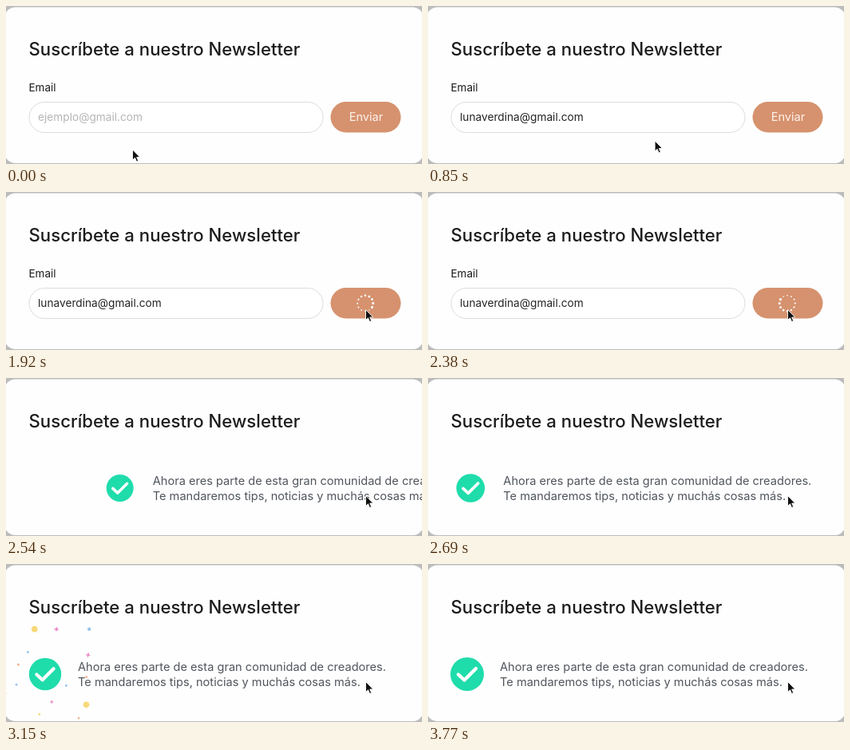
Write an HTML page that moves like this. It is 521 by 198 pixels and loops after 4380 ms.

```html
<!DOCTYPE html>
<html lang="es">
<head>
<meta charset="utf-8">
<title>Newsletter</title>
<style>
  html, body { margin: 0; width: 100%; height: 100%; overflow: hidden; background: #bcbcbc; }
  svg { display: block; width: 521px; height: 198px; font: 14.6px Inter, "Open Sans", sans-serif; }
</style>
</head>
<body>
<svg viewBox="0 0 521 198">
  <rect x="-2" y="1.5" width="525" height="195.5" rx="14" fill="#fefefe"/>
  <text x="28.5" y="62" font-size="22.2" font-weight="500" fill="#1c1c1e">Suscríbete a nuestro Newsletter</text>

  <g id="form">
    <text x="28.5" y="107" font-size="13.5" fill="#1c1c1e">Email</text>
    <rect x="29" y="120.5" width="368" height="38" rx="19" fill="#fff" stroke="#dcdcdc"/>
    <text id="email" x="40" y="144" font-size="13.7"></text>
    <rect x="406.5" y="120" width="88" height="38.5" rx="19.25" fill="#d6926e"/>
    <text id="send" x="451" y="144.3" text-anchor="middle" fill="#fdf3ec">Enviar</text>
    <g id="spinner" fill="#fff"></g>
  </g>

  <g id="message" fill="#50555c">
    <text x="90" y="133.5">Ahora eres parte de esta gran comunidad de creadores.</text>
    <text x="90" y="153">Te mandaremos tips, noticias y muchás cosas más.</text>
  </g>
  <g id="confetti"></g>
  <g id="check">
    <circle r="21" fill="#1fdcab"/>
    <path d="M-11 .5L-3.5 7.5 11-7" fill="none" stroke="#fff" stroke-width="4.4" stroke-linecap="round" stroke-linejoin="round"/>
  </g>

  <g id="cursor" stroke-linejoin="round">
    <path id="arrow" d="M0 0V13L3 10.3 5 15 7.2 14 5.2 9.5H9.3Z" fill="#111" stroke="#fff" stroke-width=".9"/>
    <path id="beam" d="M-3-7.5Q0-7.5 0-5.5V5.5Q0 7.5-3 7.5M3-7.5Q0-7.5 0-5.5M0 5.5Q0 7.5 3 7.5" fill="none" stroke="#333" stroke-width="1.1"/>
    <path id="hand" d="M-1.5 1.8Q-1.5 .3 0 .3T1.5 1.8V6.5Q3 5 4.3 6.8 6 5.6 7 7.4 9 6.8 9 9V11.5Q9 13.5 7.6 15V16.5H-.2V15L-4.6 9.8Q-5 7.6-3.2 8.2L-1.5 10ZM1.9 10.5V13.5M4 10.5V13.5M6.1 10.5V13.5" fill="#fff" stroke="#222" stroke-width="1"/>
  </g>
</svg>

<script>
const LOOP = 4380, STEP = 1000 / 13;
const $ = id => document.getElementById(id);
const clamp = v => Math.min(1, Math.max(0, v));
const span = (t, from, to) => clamp((t - from) / (to - from));
const show = (id, on) => $(id).setAttribute('opacity', +on);
const move = (el, transform) => el.setAttribute('transform', transform);

function add(parent, tag, attrs) {
  const el = document.createElementNS('http://www.w3.org/2000/svg', tag);
  for (const key in attrs) el.setAttribute(key, attrs[key]);
  return parent.appendChild(el);
}

// Cursor path: time, x, y
const path = [
  [0, 158.5, 180], [77, 158, 176], [154, 154, 163], [231, 152, 154], [620, 152, 154],
  [692, 168, 168], [769, 222, 177], [846, 284, 169], [923, 345, 168], [1000, 398, 167],
  [1077, 432, 163], [1154, 446, 157], [1380, 451, 148], [1770, 451, 148], [1846, 450.5, 147.5]
];

function cursorAt(t) {
  const i = path.findIndex(p => p[0] > t);
  if (i < 0) return path[path.length - 1].slice(1);
  const [a, b] = [path[i - 1], path[i]];
  const u = span(t, a[0], b[0]);
  return [a[1] + (b[1] - a[1]) * u, a[2] + (b[2] - a[2]) * u];
}

const DOTS = 12;
for (let i = 0; i < DOTS; i++) {
  const a = i / DOTS * 2 * Math.PI;
  add($('spinner'), 'circle', { cx: 9.8 * Math.cos(a), cy: 9.8 * Math.sin(a), r: 0.75 + 0.9 * i / DOTS });
}

const colors = { y: '#f5c022', p: '#d9339f', b: '#4c9be0', o: '#e5793f' };
const shapes = {
  dot: 'M-1 0A1 1 0 1 1 1 0A1 1 0 1 1-1 0',
  box: 'M-1-.6L.6-1 1 .6-.6 1Z',
  cross: 'M-1-.3L-.3-.3-.1-1 .4-.9 .3-.2 1 .1 .8 .5 .2 .3 0 1-.5 .9-.3 .3-1 .2Z',
  star: 'M0-1L.3-.35 1-.3 .45 .2 .6 .95 0 .5-.6 .95-.45 .2-1-.3-.3-.35Z'
};
// Offset from the badge, size, colour, shape
const bits = [
  [-11, -47, 5, 'y', 'dot'], [12, -47, 3.6, 'p', 'cross'], [46, -47, 3, 'b', 'box'],
  [-47, -45, 2.2, 'b', 'box'], [-43, -27, 2, 'y', 'dot'], [45, -20, 3.5, 'p', 'cross'],
  [-18, -23, 2, 'b', 'box'], [-28, -10, 2, 'o', 'box'], [-43, 21, 4.8, 'o', 'star'],
  [-44, 43, 3.2, 'p', 'cross'], [-6, 42, 1.8, 'y', 'dot'], [7, 29, 2.8, 'p', 'cross'],
  [43, 32, 5, 'y', 'dot'], [35, 46, 1.9, 'o', 'box'], [22, 12, 2, 'b', 'box'],
  [43, 3, 2, 'o', 'box'], [-30, 11, 2, 'b', 'box']
].map(([x, y, size, color, shape]) => ({
  x, y, size, el: add($('confetti'), 'path', { d: shapes[shape], fill: colors[color] })
}));

function draw(t) {
  const filled = t >= 538;
  $('email').textContent = filled ? 'lunaverdina@gmail.com' : 'ejemplo@gmail.com';
  $('email').setAttribute('fill', filled ? '#242426' : '#b5b5b7');

  const loading = span(t, 1700, 1900);
  $('send').setAttribute('opacity', 1 - loading);
  $('spinner').setAttribute('opacity', loading);
  move($('spinner'), `translate(450 139.5) rotate(${Math.max(0, t - 1770) * 360 / (DOTS * STEP)})`);

  const done = t >= 2460;
  show('form', !done);
  show('message', done);
  show('check', done);
  const slide = 521 * (1 - span(t, 2385, 2825)) ** 4;
  move($('message'), `translate(${slide} 0)`);
  const grow = 0.81 + 0.1 * span(t, 2540, 2920) + 0.09 * span(t, 2920, 3310);
  move($('check'), `translate(${49 + slide} 138) scale(${grow})`);

  const burst = 1.2 * (1 - (1 - span(t, 2700, 3200)) ** 3);
  const fade = 1 - span(t, 2990, 3400);
  show('confetti', t > 2700);
  $('confetti').setAttribute('opacity', t > 2700 ? fade : 0);
  for (const { x, y, size, el } of bits)
    move(el, `translate(${49 + x * burst} ${138 + y * burst}) scale(${size * (0.4 + 0.6 * fade)})`);

  const [x, y] = cursorAt(t);
  const inside = y < 158;
  const kind = inside && x < 397 ? 'beam' : inside && x > 407 && t < 1840 ? 'hand' : 'arrow';
  for (const id of ['arrow', 'beam', 'hand']) show(id, id === kind);
  move($('cursor'), `translate(${x} ${y})`);
}

function tick() {
  const t = performance.now() % LOOP;
  draw(Math.floor((t + 5) / STEP) * STEP % LOOP);
  requestAnimationFrame(tick);
}
tick();
</script>
</body>
</html>
```
